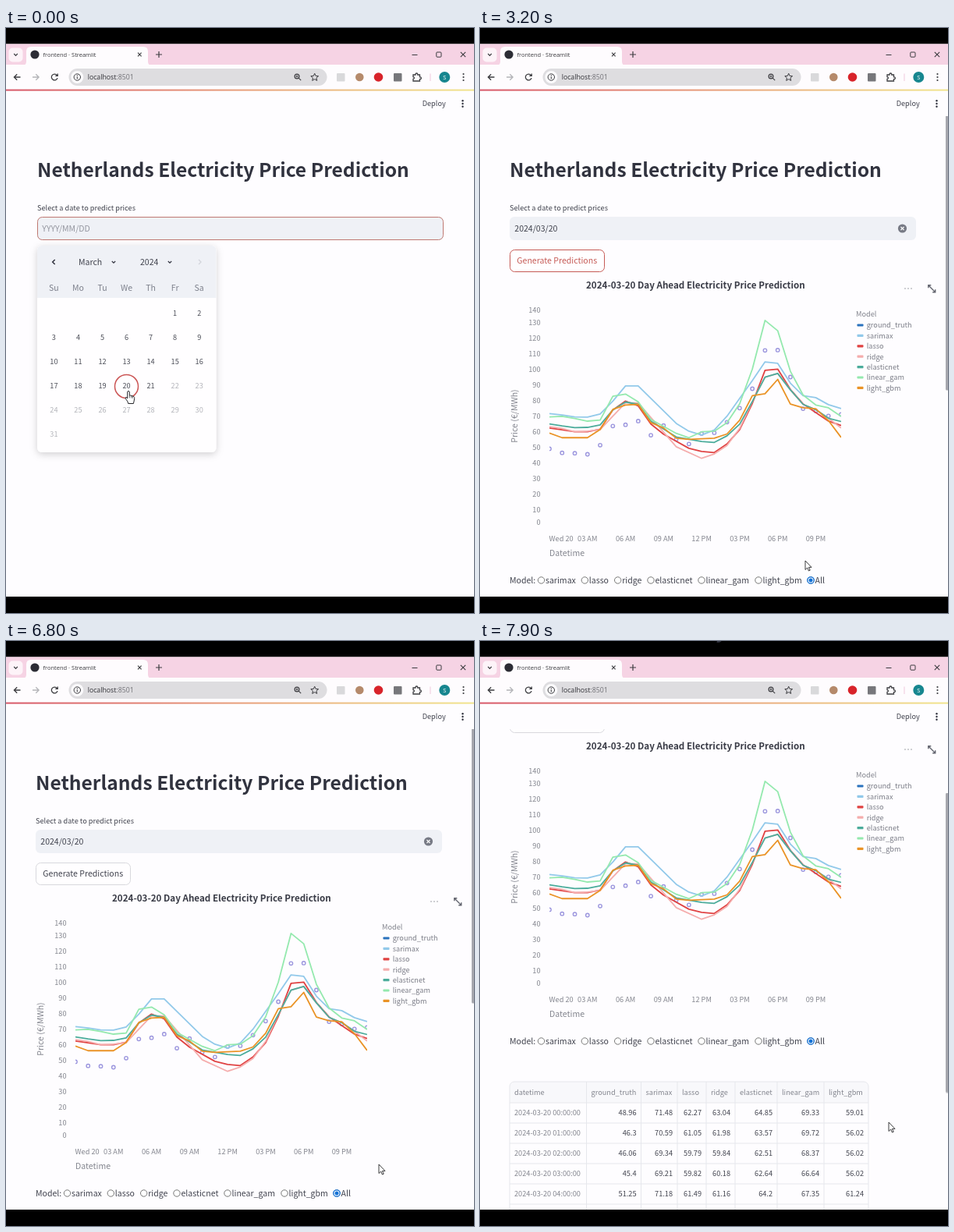
Animation of 600 by 750 pixels, one loop 8000 ms. Source, as an HTML page:

```html
<!DOCTYPE html>
<html lang="en">
<head>
<meta charset="utf-8">
<title>Price prediction demo</title>
<style>
html, body { margin: 0; width: 100%; height: 100%; overflow: hidden; background: #000; }
svg { display: block; width: 100%; height: 100%; }
text { font-family: "Noto Sans CJK JP", "Noto Sans CJK SC", "Noto Sans CJK", sans-serif; white-space: pre; }
.chrome text { font-family: "Open Sans", "Noto Sans", sans-serif; }

.anim { animation: 8s step-end -20ms infinite; }
.picking { animation-name: picking; }
.picked { animation-name: picked; }
.idle { animation-name: idle; }
.active { animation-name: active; }
.result { animation-name: result; }
.tools { animation-name: tools; }
.all { animation-name: all; }
.single { animation-name: single; }
.hand { animation-name: hand; }
.arrow { animation-name: arrow; }
.page { animation-name: scroll; }
.thumb { animation-name: thumb; }
.cursor { animation-name: move; }

@keyframes picking { 0% { opacity: 1 } 3.75%, 100% { opacity: 0 } }
@keyframes picked { 0% { opacity: 0 } 3.75%, 100% { opacity: 1 } }
@keyframes active { 0% { opacity: 0 } 11.25% { opacity: 1 } 51.25%, 100% { opacity: 0 } }
@keyframes idle { 0% { opacity: 0 } 3.75% { opacity: 1 } 11.25% { opacity: 0 } 51.25%, 100% { opacity: 1 } }
@keyframes result { 0% { opacity: 0 } 18.75%, 100% { opacity: 1 } }
@keyframes tools { 0% { opacity: 0 } 32.5%, 100% { opacity: 1 } }
@keyframes all { 0% { opacity: 1 } 53.75% { opacity: 0 } 72.5%, 100% { opacity: 1 } }
@keyframes single { 0% { opacity: 0 } 53.75% { opacity: 1 } 72.5%, 100% { opacity: 0 } }
@keyframes hand { 0% { opacity: 1 } 3.75% { opacity: 0 } 11.25% { opacity: 1 } 32.5%, 100% { opacity: 0 } }
@keyframes arrow { 0% { opacity: 0 } 3.75% { opacity: 1 } 11.25% { opacity: 0 } 32.5%, 100% { opacity: 1 } }
@keyframes scroll {
  0% { transform: translate(0, 0) }
  18.75% { transform: translate(-2px, 0) }
  93.75% { transform: translate(-2px, -6px) }
  95% { transform: translate(-2px, -24px) }
  96.25% { transform: translate(-2px, -78px) }
  97.5% { transform: translate(-2px, -140px) }
  98.75%, 100% { transform: translate(-2px, -195px) }
}
@keyframes thumb {
  0% { transform: translate(0, 0) }
  93.75% { transform: translate(0, 3.5px) }
  95% { transform: translate(0, 14px) }
  96.25% { transform: translate(0, 46px) }
  97.5% { transform: translate(0, 82px) }
  98.75%, 100% { transform: translate(0, 114.5px) }
}
@keyframes move {
  0% { transform: translate(157px, 466px) }
  5% { transform: translate(157px, 466px); animation-timing-function: steps(5) }
  11.25% { transform: translate(131px, 290px) }
  31.25% { transform: translate(131px, 290px); animation-timing-function: steps(7) }
  40% { transform: translate(417px, 683px); animation-timing-function: steps(2) }
  42.5% { transform: translate(402px, 706px); animation-timing-function: steps(7) }
  51.25% { transform: translate(356px, 705px) }
  52.5% { transform: translate(356px, 705px); animation-timing-function: steps(4) }
  57.5% { transform: translate(304px, 707px); animation-timing-function: steps(4) }
  62.5% { transform: translate(300px, 707px) }
  63.75% { transform: translate(300px, 707px); animation-timing-function: steps(6) }
  71.25% { transform: translate(423px, 705px) }
  80% { transform: translate(423px, 705px); animation-timing-function: steps(4) }
  85% { transform: translate(478px, 671px); animation-timing-function: steps(5) }
  91.25%, 100% { transform: translate(524px, 617px) }
}
</style>
</head>
<body>
<svg id="stage" viewBox="0 0 600 750" xmlns="http://www.w3.org/2000/svg"></svg>
<script>
const INK = '#31333f', BODY = '#41434e', GREY = '#83858e', RED = '#c65b56', PAPER = '#fefdff';
const S = 9.2, M = 10.55;

// cy is the middle of the capitals
const text = (x, cy, str, size = S, fill = BODY, attrs = '') =>
  `<text x="${x}" y="${(cy + size * .375).toFixed(2)}" font-size="${size}" fill="${fill}" ${attrs}>${str}</text>`;
const mid = 'text-anchor="middle"', end = 'text-anchor="end"', bold = 'font-weight="700"';
const rect = (x, y, w, h, fill, r = 0, attrs = '') =>
  `<rect x="${x}" y="${y}" width="${w}" height="${h}" rx="${r}" fill="${fill}" ${attrs}/>`;
const dot = (x, y, r, fill, attrs = '') => `<circle cx="${x}" cy="${y}" r="${r}" fill="${fill}" ${attrs}/>`;
const line = (d, stroke, w = 1.2, attrs = '') =>
  `<path d="${d}" fill="none" stroke="${stroke}" stroke-width="${w}" ${attrs}/>`;
const show = (name, body) => `<g class="anim ${name}">${body}</g>`;

// Hourly prices; a gap means a straight run between its neighbours
const _ = null;
const truth = [48.96, 46.3, 46.06, 45.4, 51.25, 63.5, 64.3, 66.7, 57.6, 63.8, 55, 52,
  58.7, 59.2, 66, 75, 87.4, 112, 112.2, 94.9, 74.6, 73.2, 70, 71];
const sarimax = [71.48, 70.59, 69.34, 69.21, 71.18, 79.5, 89.2, 89.2, _, _, 65.2, 60.2,
  57.7, 61, 69.8, _, 92.6, 104.6, 103.7, 91, 83, 81.7, 77.2, 74.7];
const lasso = [62.27, 61.05, 59.79, 59.82, 61.49, 73.8, 79.5, 76.4, 64.8, 58.3, _, 49.2,
  47.2, 46.5, 52, 61.2, 78, 99.2, 100, 87, 77.7, _, 66.7, 63.8];
const ridge = [63.04, 61.98, 59.84, 60.18, 61.16, 69.8, 78.3, 78.3, 69, _, 50.2, _,
  42.8, 45.6, 51, 62, 79.2, 94.8, 97.2, 86.7, 77.4, 74, 68.5, 62.2];
const elastic = [64.85, 63.57, 62.51, 62.64, 64.2, 73.8, 78.9, 77.4, 66.6, _, 56.5, _,
  53.6, 53, 57.2, 64.7, ...ridge.slice(16, 23), 66.4];
const gam = [69.33, 69.72, 68.37, 66.64, 67.35, 82.6, 84, 79, 67.8, _, 58.8, 56,
  59.8, 60.2, 65.6, 77.8, 100, 131.2, 124.6, 98.6, 83.4, 77, 75.2, 69.7];
const gbm = [59.01, 56.02, 56.02, 56.02, 61.24, 74.2, 77, 77.4, 65.7, 62.2, 55.7, 55,
  _, 55.7, 58.4, 67.2, 83, 84.2, 93.4, 77.6, 75.2, 74.6, 67, 56.2];

const models = [
  { name: 'ground_truth', color: '#2a72bd', data: truth },
  { name: 'sarimax', color: '#92c9ea', data: sarimax },
  { name: 'lasso', color: '#e04242', data: lasso },
  { name: 'ridge', color: '#f5adad', data: ridge },
  { name: 'elasticnet', color: '#4bac9b', data: elastic },
  { name: 'linear_gam', color: '#94e9ae', data: gam },
  { name: 'light_gbm', color: '#ea9326', data: gbm },
];
const hourX = h => +(89 + h * 16.26).toFixed(2);
const priceY = v => +(637.3 - 2 * v).toFixed(2);

function form() {
  const button = (border, ink) =>
    rect(40.5, 284.5, 121, 28, '#fffeff', 6, `stroke="${border}"`) + text(49.3, 298, 'Generate Predictions', M, ink);
  return text(40, 182, 'Netherlands Electricity Price Prediction', 24.6, INK, bold)
    + text(40, 230.5, 'Select a date to predict prices')
    + rect(40, 242, 521, 30, '#eff1f6', 6)
    + show('picking', rect(40.5, 242.5, 520, 29, 'none', 6, 'stroke="#bf7871"') + text(46.3, 257, 'YYYY/MM/DD', M, '#94969f'))
    + show('picked', text(46.3, 257, '2024/03/20', M)
      + dot(543.5, 257, 5.6, '#777a85') + line('M541.5 255l4 4m0-4l-4 4', '#fff', 1.2))
    + show('idle', button('#d8d8dd', BODY))
    + show('active', button(RED, RED));
}

function calendar() {
  const colX = c => 61.4 + c * 31.05;
  const chevron = (x, y) => line(`M${x - 2.2} ${y - 1}l2.2 2.2 2.2-2.2`, INK, 1.2);
  let out = rect(40, 279, 229.5, 265, '#fffeff', 6, 'filter="url(#shadow)"')
    + `<path d="M40 346V285a6 6 0 0 1 6-6H263.5a6 6 0 0 1 6 6V346z" fill="#eff1f6"/>`
    + line('M62.7 297l-3 3 3 3', INK, 1.5) + line('M247 297l3 3-3 3', '#d3d5db', 1.3)
    + text(93, 300, 'March', M) + chevron(138, 300)
    + text(172, 300, '2024', M) + chevron(210, 300);
  ['Su', 'Mo', 'Tu', 'We', 'Th', 'Fr', 'Sa'].forEach((d, c) => out += text(colX(c), 333.5, d, M, '#7d808c', mid));
  for (let day = 1; day <= 31; day++) {
    const cell = day + 4;
    out += text(colX(cell % 7), 365.5 + 31.1 * Math.floor(cell / 7), day, S, day > 21 ? '#b3b4ba' : '#4b4d57', mid);
  }
  return show('picking', out + dot(154.5, 459.5, 15, 'none', 'stroke="#cb5555" stroke-width="1.5"'));
}

function curve({ data, color }) {
  const pts = data.map((v, h) => v === null ? '' : `${hourX(h)},${priceY(v)}`).filter(Boolean);
  return `<polyline points="${pts.join(' ')}" fill="none" stroke="${color}" stroke-width="1.8" stroke-linejoin="round"/>`;
}

function chart() {
  let out = text(136, 329.5, '2024-03-20 Day Ahead Electricity Price Prediction', 11.62, '#3a3c47', bold);
  for (let v = 0; v <= 140; v += 10) {
    const y = v === 0 ? 633.3 : v === 140 ? 361.5 : priceY(v);
    out += text(77.5, y, v, S, GREY, end);
  }
  ['Wed 20', '03 AM', '06 AM', '09 AM', '12 PM', '03 PM', '06 PM', '09 PM'].forEach((label, i) =>
    out += text(i ? hourX(i * 3) : 88.5, 655, label, S, GREY, i ? mid : ''));
  out += text(89, 673, 'Datetime', M, GREY)
    + `<g transform="translate(44 497.5) rotate(-90)">${text(0, 0, 'Price (€/MWh)', M, GREY, mid)}</g>`;

  const dots = truth.map((v, h) => dot(hourX(h), priceY(v), 2.2, '#fff', 'stroke="#9c96de" stroke-width="1.4"')).join('');
  out += `<g clip-path="url(#plot)">${dots}${show('all', models.slice(1, 6).map(curve).join(''))}${curve(models[6])}</g>`;

  out += text(482, 367, 'Model', S, GREY);
  models.forEach((m, i) => {
    const y = 381 + i * 13.4;
    out += rect(483.5, y - 1.6, 8, 3.2, m.color, .8) + text(495.7, y, m.name, S, '#7b7d87');
  });
  out += show('tools', [545, 549, 553].map(x => dot(x, 334, 1.1, '#c3c4c9')).join('')
    + line('M575.5 330.5l7.5 7.5M574.8 333.3v-3.5h3.5M583.7 335.2v3.5h-3.5', '#62646e', 1.4));
  return out;
}

function radios() {
  const xs = [78.5, 134.3, 176.7, 219, 284, 357, 424];
  const names = [...models.slice(1).map(m => m.name), 'All'];
  const ring = x => dot(x, 708, 4.2, '#fff', 'stroke="#777" stroke-width="1"');
  const on = x => dot(x, 708, 4.2, '#fff', 'stroke="#1673d6" stroke-width="1.3"') + dot(x, 708, 2.5, '#1673d6');
  return text(38, 708.5, 'Model:', M)
    + xs.map((x, i) => ring(x) + text(x + 5.5, 708.5, names[i], M)).join('')
    + show('all', on(xs[6])) + show('single', on(xs[5]));
}

function table() {
  const cols = [38, 136.5, 206.5, 253, 290, 327, 381, 441, 498], top = 760;
  const names = ['datetime', ...models.map(m => m.name)];
  let grid = '', out = `<path d="M38 787V766a6 6 0 0 1 6-6H492a6 6 0 0 1 6 6V787z" fill="#f8f8fb"/>`;
  names.forEach((n, c) => out += text(cols[c] + 6, top + 14, n, S, GREY));
  for (let r = 0; r < 5; r++) {
    const y = top + 40 + r * 26;
    out += text(44, y, `2024-03-20 0${r}:00:00`, S, GREY);
    models.forEach((m, c) => out += text(cols[c + 2] - 6, y, m.data[r], S, BODY, end));
  }
  for (let r = 0; r < 6; r++) grid += `M38 ${top + 27 + r * 26}H498`;
  cols.slice(1, -1).forEach(x => grid += `M${x} ${top}V940`);
  return out + line(grid, '#e6e7ec', 1) + rect(38, top, 460, 190, 'none', 6, 'stroke="#e6e7ec"');
}

function browser() {
  const dark = '#3c3c40';
  const cross = (x, y, r) => line(`M${x - r} ${y - r}l${2 * r} ${2 * r}m0 ${-2 * r}l${-2 * r} ${2 * r}`, dark, 1.1);
  const tabs = rect(0, 20.5, 600, 27.5, '#f6d3e4')
    + rect(3.5, 25.5, 18, 18, '#fdf3f8', 5) + line('M10.2 33l2.3 2.3 2.3-2.3', dark, 1.2)
    + `<path d="M21 48q5 0 5-5V30q0-6 6-6H176q6 0 6 6V43q0 5 5 5z" fill="#fefcfe"/>`
    + dot(37, 34, 5.6, '#2c2d35')
    + text(47.5, 34.2, 'frontend · Streamlit', 7.5, '#3a3a3e')
    + cross(171.3, 34, 2.3) + line('M192 34h8m-4-4v8', dark, 1.2)
    + line('M520.5 34.5h7', dark, 1) + rect(551.8, 31, 6.2, 6.2, 'none', 1, `stroke="${dark}"`) + cross(586, 34, 3.2);
  const bar = rect(0, 47, 600, 33, '#fefcfe')
    + line('M18.5 63h-8m3.7-3.8l-3.8 3.8 3.8 3.8', dark, 1.3)
    + line('M34 63h8m-3.7-3.8l3.8 3.8-3.8 3.8', '#b4b4b8', 1.3)
    + line('M65.4 60.7a3.9 3.9 0 1 0 .6 3.4M66.2 58.6v2.8h-2.9', dark, 1.3)
    + rect(80.5, 52, 331, 22, '#dedde0', 11)
    + dot(91.3, 63, 8, '#fbfafc') + dot(91.3, 63, 4.2, 'none', `stroke="${dark}"`) + line('M91.3 62.4v2.8m0-4.9v1.1', dark, 1.1)
    + text(104.7, 63, 'localhost<tspan fill="#707075">:8501</tspan>', 8.75, '#333338')
    + dot(373, 62, 2.9, 'none', `stroke="${dark}" stroke-width="1.2"`) + line('M375.2 64.2l3 3M371.6 62h2.8M373 60.6v2.8', dark, 1.1)
    + `<path d="M395.7 58.2l1.4 3.2 3.5.3-2.7 2.3.8 3.4-3-1.8-3 1.8.8-3.4-2.7-2.3 3.5-.3z" fill="none" stroke="${dark}"/>`
    + rect(424, 58, 10.5, 10.5, '#d9d9db', 1)
    + dot(453.3, 63, 5.3, '#b58a6b') + dot(477.5, 63, 5.8, '#d8232a') + rect(497, 58, 10.5, 10.5, '#77777b', 1)
    + line('M522 60h3v-.6a1.4 1.4 0 0 1 2.8 0V60h2.7v2.8h.5a1.4 1.4 0 0 1 0 2.8h-.5V68H522v-2.6a1.4 1.4 0 0 0 0-2.8z', dark, 1.3)
    + line('M544 58.5v9.5', '#f0c8dc', 1)
    + dot(562.3, 63, 7, '#17868f') + text(562.3, 63, 'S', 7.5, '#fff', mid)
    + [59, 63, 67].map(y => dot(586.5, y, 1.1, dark)).join('');
  return `<g class="chrome">${tabs}${bar}</g>`;
}

const header = rect(0, 78, 600, 35, PAPER)
  + text(533.7, 97, 'Deploy') + [93.2, 97, 100.8].map(y => dot(585.5, y, 1.2, INK)).join('');

const pointer = show('cursor', show('hand',
    `<path d="M-1.3.8a1.3 1.3 0 0 1 2.6 0V5.2l1.2-.2 1.5.5 1.5.4 1.4.6q1 .6.8 2L7.2 12 6.4 15.5H-.3L-1 13-3.7 9.2q-.7-1.4.5-1.8 1 0 1.9 1.6z" fill="#fff" stroke="#26262a" stroke-linejoin="round"/>`
    + line('M1.3 5.2v3.2M3.8 5.6v2.9M5.4 6v2.7', '#26262a', .7))
  + show('arrow', `<path d="M0 0V11.5L2.7 9 4.4 13 6.2 12.2 4.5 8.4H8Z" fill="#fff" stroke="#26262a" stroke-width=".9"/>`));

document.getElementById('stage').innerHTML = `
  <defs>
    <linearGradient id="ribbon"><stop stop-color="#d8596a"/><stop offset=".5" stop-color="#e8a07c"/><stop offset="1" stop-color="#f1e58e"/></linearGradient>
    <clipPath id="plot"><rect x="89" y="355" width="374" height="285"/></clipPath>
    <filter id="shadow" x="-15%" y="-15%" width="130%" height="130%"><feDropShadow dx="0" dy="2.5" stdDeviation="5" flood-color="#000" flood-opacity=".18"/></filter>
  </defs>`
  + rect(0, 20.5, 600, 709, PAPER)
  + show('page', form() + show('result', `<g transform="translate(2 0)">${chart()}${radios()}${table()}</g>`) + calendar())
  + show('result', show('thumb', rect(597, 80, 4, 384.5, '#a6a7ae', 1.5)))
  + header + browser() + rect(0, 78.6, 600, 2, 'url(#ribbon)')
  + rect(0, 729, 600, 21, '#000')
  + pointer;
</script>
</body>
</html>
```
